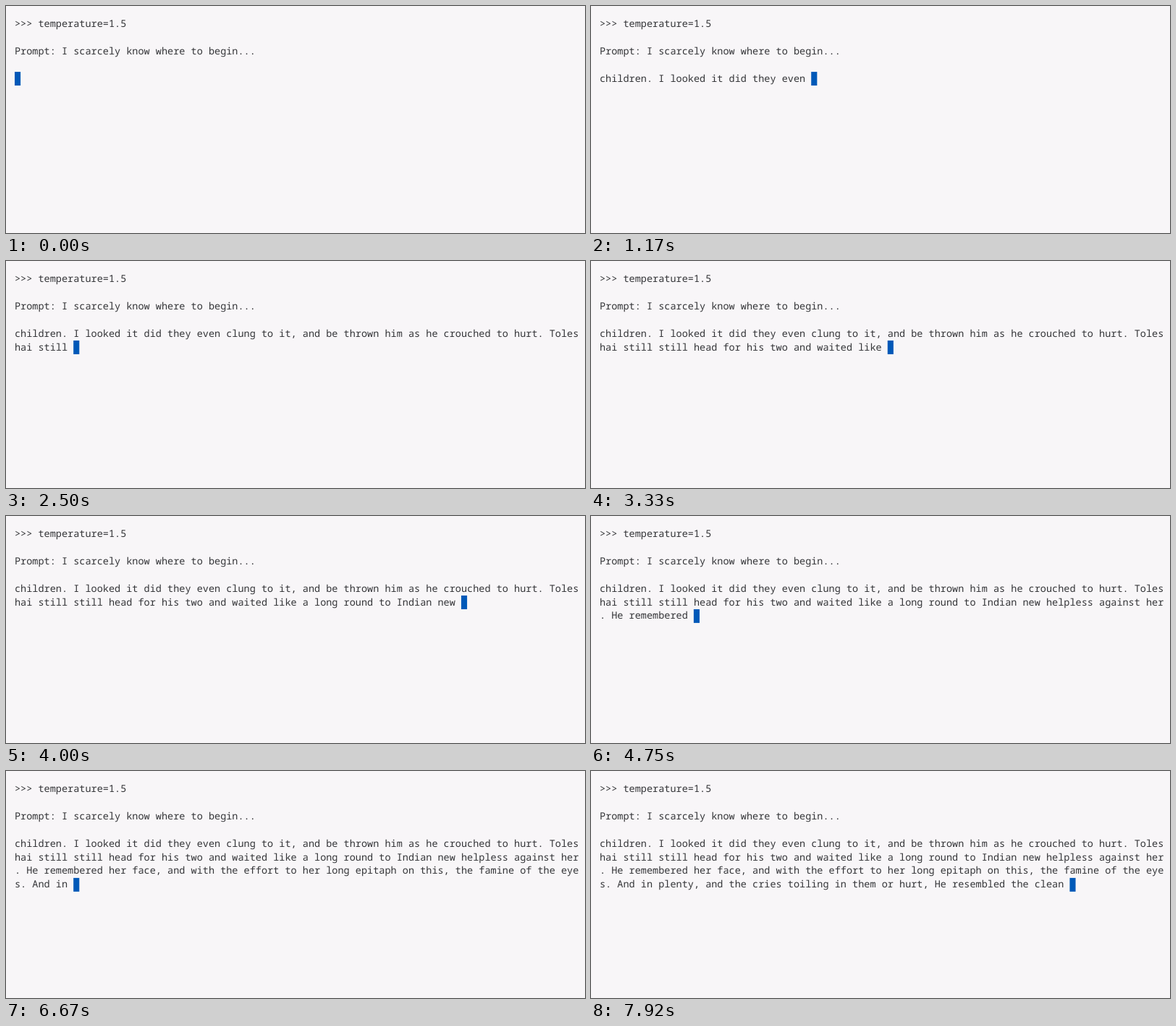
An HTML page for the animation above (8000 ms loop, 800 by 314 pixels).

```html
<!DOCTYPE html>
<html lang="en">
<head>
<meta charset="utf-8">
<title>Text generation</title>
<style>
  html, body { margin: 0; width: 100%; height: 100%; overflow: hidden; background: #f8f6f8; }
  pre {
    position: absolute; left: 0; top: 0; margin: 0;
    font: 15px/21px "Noto Sans Mono", "DejaVu Sans Mono", monospace;
    color: #343538; text-rendering: geometricPrecision;
    transform: translate(12px, 15.3px) scale(.902); transform-origin: 0 0;
  }
  i { display: inline-block; width: 9px; height: 21px; vertical-align: top; background: #0059b8; }
</style>
</head>
<body>
<pre>&gt;&gt;&gt; temperature=1.5

Prompt: I scarcely know where to begin...

<span id="out"></span><i></i></pre>
<script>
const LOOP = 8000, FPS = 12, COLUMNS = 96, FIRST_TICK = 7;
const words = ("children. I looked it did they even clung to it, and be thrown him as he " +
  "crouched to hurt. Toleshai still still head for his two and waited like a long round " +
  "to Indian new helpless against her. He remembered her face, and with the effort to her " +
  "long epitaph on this, the famine of the eyes. And in plenty, and the cries toiling in " +
  "them or hurt, He resembled the clean").split(" ");
// One word per tick, except during these pauses.
const pauses = [11, 27, 29, 34, 38, 43, 46, 49, 51, 53, 56, 65, 70, 73, 77, 86, 88];
const out = document.getElementById("out");
let shown = -1;

function wrap(text) {
  let lines = "";
  for (let i = 0; i < text.length; i += COLUMNS) {
    lines += (i ? "\n" : "") + text.slice(i, i + COLUMNS);
  }
  return lines;
}

function draw(now) {
  const tick = Math.floor((now % LOOP + 5) * FPS / 1000);
  const paused = pauses.filter(p => p <= tick).length;
  const count = Math.max(0, tick - FIRST_TICK + 1 - paused);
  if (count !== shown) {
    shown = count;
    out.textContent = wrap(words.slice(0, count).map(w => w + " ").join(""));
  }
}

const start = performance.now();
function frame() {
  draw(performance.now() - start);
  requestAnimationFrame(frame);
}
frame();
</script>
</body>
</html>
```
